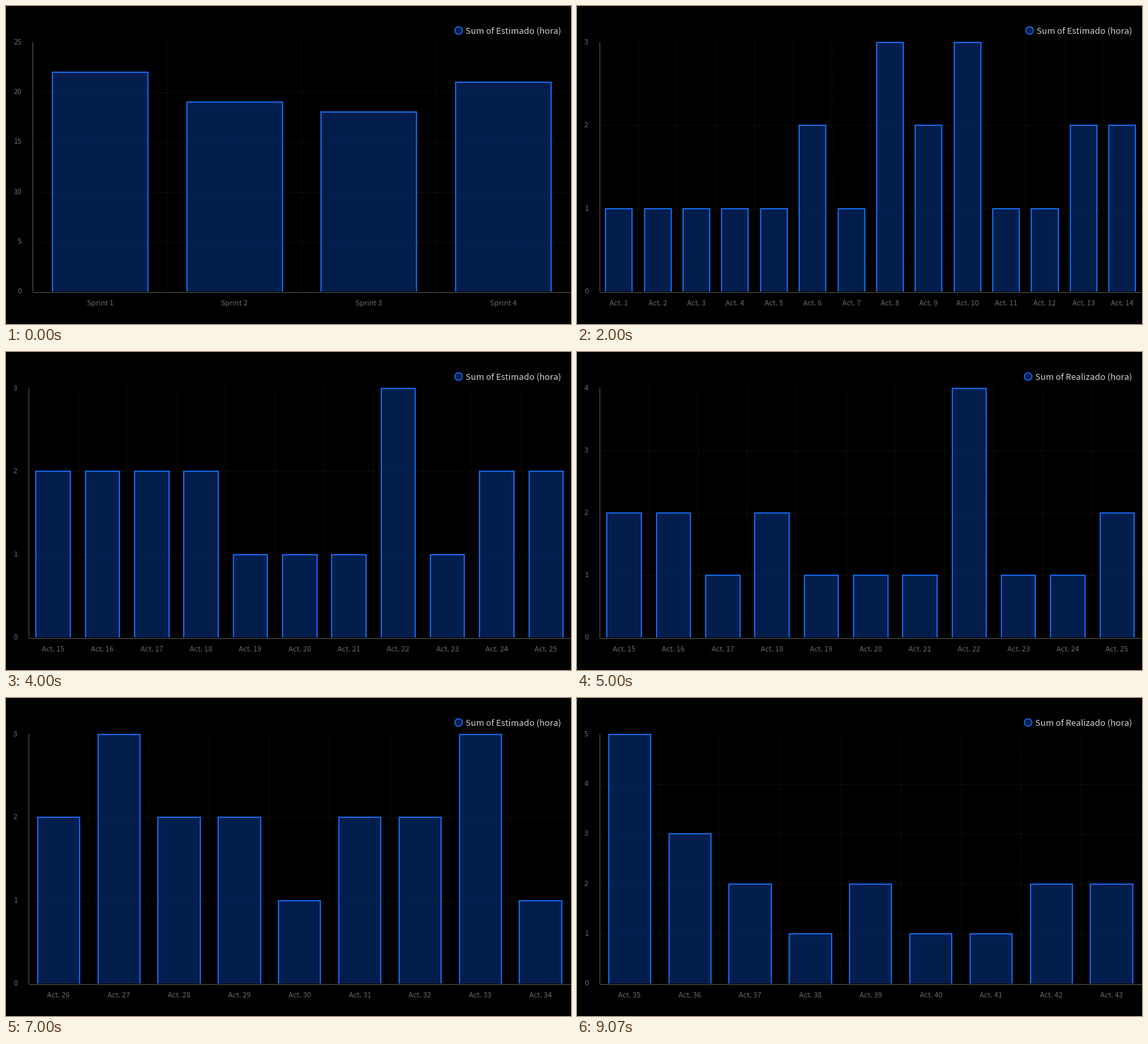
Write a matplotlib script that moves like this. It is 852 px wide and 480 px high and loops after 9.99 s.

```python
import matplotlib.pyplot as plt
from matplotlib.animation import FuncAnimation
from matplotlib.patches import Circle, Rectangle

W, H, DPI = 852, 480, 100
PX = 72 / DPI
TOP, BASE, RIGHT = 54, 431, 851.5
FONT = "Noto Sans CJK JP"

BLUE = "#1463de"
FILL = (0.04, 0.35, 0.93, 0.33)
GRID = "#23281a"
AXIS_Y, AXIS_X = "#56566a", "#50543f"
LABEL, LEGEND = "#676a70", "#cfd1d4"


def hours(first, last, usual, **odd):
    """Usual hours for every activity, except those named a<number>."""
    return [odd.get(f"a{n}", usual) for n in range(first, last + 1)]


ESTIMATED = [
    hours(1, 14, 1, a6=2, a8=3, a9=2, a10=3, a13=2, a14=2),
    hours(15, 25, 2, a19=1, a20=1, a21=1, a22=3, a23=1),
    hours(26, 34, 2, a27=3, a30=1, a33=3, a34=1),
    hours(35, 43, 2, a35=4, a36=3, a41=3, a43=1),
]
DONE = [
    hours(1, 14, 1, a8=4, a9=2, a10=3, a14=2),
    hours(15, 25, 1, a15=2, a16=2, a18=2, a22=4, a25=2),
    hours(26, 34, 1, a27=4, a33=3),
    hours(35, 43, 2, a35=5, a36=3, a38=1, a40=1, a41=1),
]


def build_slides():
    """Sprint totals first, then both series of each sprint."""
    slides = [("Estimado", "Sprint", 1, [sum(s) for s in ESTIMATED]),
              ("Realizado", "Sprint", 1, [sum(s) for s in DONE])]
    first = 1
    for k, (est, done) in enumerate(zip(ESTIMATED, DONE)):
        pair = [("Estimado", "Act.", first, est),
                ("Realizado", "Act.", first, done)]
        # the third sprint shows its series in reverse
        slides += pair[::-1] if k == 2 else pair
        first += len(est)
    return slides


SLIDES = build_slides()
fig = plt.figure(figsize=(W / DPI, H / DPI), dpi=DPI, facecolor="black")
ax = fig.add_axes([0, 0, 1, 1])


def line(xs, ys, color, width=1, **kw):
    ax.plot(xs, ys, color=color, lw=width * PX, solid_capstyle="butt",
            solid_joinstyle="miter", **kw)


def dotted(xs, ys):
    line(xs, ys, GRID, ls=(0, (1, 3)), antialiased=False, zorder=1)


def text(x, y, s, size, color, ha):
    ax.text(x, y, s, fontsize=size * PX, color=color, ha=ha, va="baseline",
            family=FONT)


def draw_bar(x, y, w):
    ax.add_patch(Rectangle((x, y), w, BASE - y, fc=FILL, lw=0, zorder=2))
    l, r, t = x + 1, x + w - 1, y + 0.7
    line([l, l, r, r], [BASE, t, t, BASE], BLUE, 2, zorder=3)


def draw_legend(series):
    x = 682.5 if series == "Estimado" else 680.3
    ax.add_patch(Circle((x, 37), 5.6, fc=FILL, ec=BLUE, lw=1.8 * PX))
    text(x + 10.8, 41.3, f"Sum of {series} (hora)", 13.1, LEGEND, "left")


def draw(i):
    series, prefix, first, values = SLIDES[i]
    ax.cla()
    ax.set_xlim(0, W)
    ax.set_ylim(H, 0)
    ax.axis("off")

    step = 5 if max(values) > 10 else 1
    top = -(-max(values) // step) * step
    left = 34 if top < 10 else 40.4
    slot = (RIGHT - left) / len(values)
    unit = (BASE - TOP) / top

    for v in range(0, top + 1, step):
        y = BASE - v * unit
        text(left - 17, y + 3.5, str(v), 11, LABEL, "right")
        if 0 < v < top:
            dotted([left, RIGHT], [y + 0.5] * 2)

    for k, v in enumerate(values):
        mid = left + (k + 0.5) * slot
        if k:
            dotted([left + k * slot - 0.5] * 2, [TOP, BASE])
        draw_bar(mid - 0.36 * slot, BASE - v * unit, 0.72 * slot)
        text(mid, 451.7, f"{prefix} {first + k}", 11, LABEL, "center")

    line([left, left], [TOP, BASE], AXIS_Y, zorder=4)
    line([left, RIGHT], [BASE + 1] * 2, AXIS_X, zorder=4)
    draw_legend(series)
    return []


anim = FuncAnimation(fig, draw, frames=len(SLIDES), init_func=lambda: draw(0),
                     interval=999, repeat=True, repeat_delay=0)
plt.show()
```
